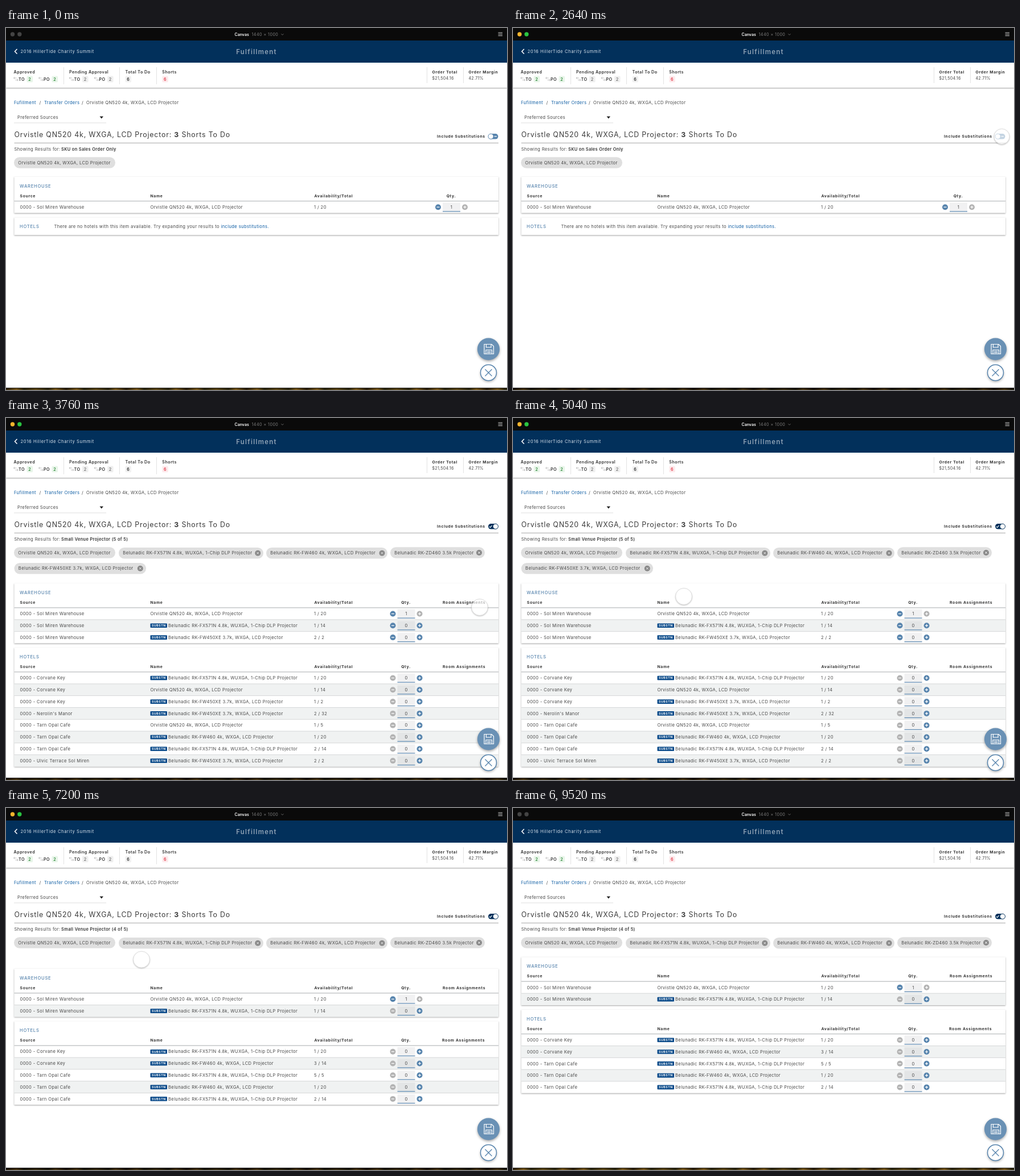
Recreate the animation shown at these times as an HTML page. Size 880x637 px, loop 9600 ms.

```html
<!DOCTYPE html>
<html lang="en">
<head>
<meta charset="utf-8">
<title>Fulfillment</title>
<style>
  html, body { margin: 0; width: 100%; height: 100%; overflow: hidden; background: #fff; }
  svg { display: block; width: 880px; height: 637px; font-family: Inter, "Open Sans", sans-serif; }
  text { white-space: pre; }
  .raised { filter: drop-shadow(0 1px 1.3px rgba(0, 0, 0, .38)); }
  .floating { filter: drop-shadow(0 2px 2px rgba(0, 0, 0, .35)); }
</style>
</head>
<body>
<svg id="stage" viewBox="0 0 880 637"></svg>
<script>
const LOOP = 9600, STEP = 80;
const BLUE = '#5784ad', NAVY = '#02305b', LINK = '#0c5ca3', INK = '#484848', GRAY = '#b3b3b3';

// size, weight, letter spacing (em), colour
const STYLES = {
  body: [7.6, 400, .05, INK],
  strong: [7.4, 600, .05, '#333'],
  label: [7.2, 600, .065, '#333'],
  head: [6.8, 700, .1, '#333'],
  section: [7.6, 500, .1, BLUE],
  title: [12.4, 400, .065, '#3c3c3c'],
  amount: [7.2, 400, .03, INK],
  tag: [5.2, 700, .11, '#fff'],
  page: [11.4, 600, .11, '#8fa2b5'],
  event: [7.5, 400, .09, '#dce5ee'],
  window: [7, 600, 0, '#fff'],
  size: [7.2, 400, .06, '#7d7d7d'],
};

const text = (x, y, str, style = 'body', color, anchor = 'start') => {
  const [size, weight, spacing, ink] = STYLES[style];
  return `<text x="${x}" y="${y + size * .36}" font-size="${size}" font-weight="${weight}"
    letter-spacing="${spacing * size}" fill="${color || ink}" text-anchor="${anchor}">${str}</text>`;
};
const rect = (x, y, w, h, fill, extra = '') =>
  `<rect x="${x}" y="${y}" width="${w}" height="${h}" fill="${fill}" ${extra}/>`;
const circle = (x, y, r, fill, extra = '') => `<circle cx="${x}" cy="${y}" r="${r}" fill="${fill}" ${extra}/>`;
const line = (d, color, width = 1, extra = '') =>
  `<path d="${d}" fill="none" stroke="${color}" stroke-width="${width}" ${extra}/>`;
const group = (id, content, extra = '') => `<g id="${id}" ${extra}>${content}</g>`;

const MAIN = 'Orvistle QN520 4k, WXGA, LCD Projector';
const DLP = 'Belunadic RK-FX571N 4.8k, WUXGA, 1-Chip DLP Projector';
const LCD = 'Belunadic RK-FW460 4k, WXGA, LCD Projector';
const SMALL = 'Belunadic RK-ZD460 3.5k Projector';
const ZOOM = 'Belunadic RK-FW450XE 3.7k, WXGA, LCD Projector';
const DEPOT = 'Sol Miren Warehouse', BAY = 'Corvane Key', CAFE = 'Tarn Opal Cafe';

function stepper(cx, y, qty, canRemove, canAdd) {
  const button = (x, on, d) => circle(x, y, 5, on ? BLUE : GRAY) + line(`M${x - 2.5} ${y}h5${d}`, '#fff', 1.2);
  return button(cx - 23.5, canRemove, '') + button(cx + 23.5, canAdd, 'm-2.5 -2.5v5') +
    rect(cx - 15.5, y - 8, 31, 15, 'rgba(0,15,30,.055)') +
    rect(cx - 15.5, y + 7, 31, 1.2, BLUE) + text(cx, y, qty, 'body', INK, 'middle');
}

// rows: [source, product, availability, quantity, can remove]
function card(top, name, rows, { qtyX = 703, rooms = 767 } = {}) {
  const base = top + 43, pitch = 20.8;
  let out = rect(14.5, top, 850.5, 43 + pitch * rows.length, '#fff', 'class="raised"') +
    text(24, top + 16.3, name, 'section') +
    text(24.5, top + 33.5, 'Source', 'head') + text(253.5, top + 33.5, 'Name', 'head') +
    text(541.5, top + 33.5, 'Availability/Total', 'head') +
    text(qtyX - .5, top + 33.5, 'Qty.', 'head', '', 'middle') +
    (rooms ? text(rooms, top + 33.5, 'Room Assignments', 'head') : '');
  rows.forEach(([source, product, stock, qty, canRemove], i) => {
    const y = base + pitch * i, mid = y + 10.5, sub = product !== MAIN;
    if (i % 2) out += rect(14.5, y, 850.5, pitch, '#f0f2f2');
    if (i) out += rect(14.5, y - .4, 850.5, .9, '#d2d4d5');
    out += text(24.5, mid, '0000 - ' + source) + text(sub ? 285 : 253.5, mid, product) +
      text(541, mid, stock) + stepper(qtyX, mid, qty, canRemove, !qty);
    if (sub) out += rect(253.5, mid - 3.8, 29.5, 7.6, '#0b4b8a', 'rx="1"') + text(256, mid, 'SUBSTN', 'tag');
  });
  return out + rect(14.5, base - .8, 850.5, 1.3, '#bcbfc1');
}

const cross = (x, y, s) => `M${x - s} ${y - s}l${2 * s} ${2 * s}m0 ${-2 * s}l${-2 * s} ${2 * s}`;
const chip = (x, y, w, label, icon, fill = '#dfdfdf', ink = INK, disc = '#888', mark = '#eee') =>
  rect(x, y - 9.8, w, 19.6, fill, 'rx="9.8"') + text(x + 7.3, y, label, 'body', ink) +
  (icon ? circle(icon, y, 5, disc) + line(cross(icon, y, 1.9), mark, 1) : '');

function header() {
  const swap = x => line(`M${x + 2} 86l-2 2 2 2M${x} 88h5M${x + 6} 89.5l2 2 -2 2M${x + 3} 91.5h5`, '#aaa', .7);
  const badge = (x, n, ink, fill) =>
    rect(x, 84.5, 10.5, 11, fill, 'rx="1.5"') + text(x + 5.3, 90, n, 'label', ink, 'middle');
  const orders = (x, ink, fill) => swap(x) + text(x + 8.5, 90, 'TO', 'label') + badge(x + 23, 2, ink, fill) +
    swap(x + 44) + text(x + 52.5, 90, 'PO', 'label') + badge(x + 67, 2, ink, fill);
  const rule = (x, h) => rect(x, 69, 1, h, '#e2e2e2');
  return rect(0, 61, 880, 44, '#fff', 'class="raised"') +
    rect(0, 0, 880, 22, '#0a0a0a') + rect(0, 22, 880, 39, NAVY) +
    text(401.5, 11, 'Canvas', 'window') + text(431.5, 11, '1440 × 1000', 'size') +
    line('M483.5 10.3l2 2 2-2', '#777', .9) +
    line('M864.5 8.2h7.5m-7.5 2.7h7.5m-7.5 2.7h7.5', '#ccc', 1) +
    line('M19.5 37l-4 4.3 4 4.3', '#fff', 1.5) +
    text(25.5, 41.5, '2016 HillerTide Charity Summit', 'event') +
    text(440, 42, 'Fulfillment', 'page', '', 'middle') +
    text(13.5, 77.3, 'Approved', 'label') + orders(13.5, '#2f8a3c', '#e8f5e9') +
    text(111, 77.3, 'Pending Approval', 'label') + orders(111, '#777', '#efefef') +
    text(209.5, 77.3, 'Total To Do', 'label') + badge(209.5, 6, '#333', '#f1f1f1') +
    text(274.3, 77.3, 'Shorts', 'label') + badge(274.3, 6, '#e2404f', '#fdeaec') +
    rule(101, 30) + rule(199, 30) + rule(264, 30) + rule(739, 28) + rule(803, 28) +
    text(748.5, 78, 'Order Total', 'head') + text(748.5, 88.5, '$21,504.16', 'amount') +
    text(812.5, 78, 'Order Margin', 'head') + text(812.5, 88.5, '42.71%', 'amount');
}

function intro() {
  return text(14, 131.7, 'Fufillment', 'body', LINK) + text(58.5, 131.7, '/') +
    text(67, 131.7, 'Transfer Orders', 'body', LINK) + text(133, 131.7, '/') + text(141, 131.7, MAIN) +
    text(20, 157.3, 'Preferred Sources') + rect(14, 166.5, 162, .9, '#dcdcdc') +
    '<path d="M164.5 155.5h6.5l-3.2 4z" fill="#222"/>' +
    text(14.5, 188, MAIN + ': <tspan font-weight="700">3</tspan> Shorts To Do', 'title') +
    rect(14.5, 201.7, 850.5, 1.4, '#bebebe') +
    text(757, 190.8, 'Include Substitutions', 'head') +
    text(14.5, 213.7, 'Showing Results for:') + chip(14, 237, 178, MAIN);
}

const toggle = () => rect(847, 186, 17.5, 9.6, BLUE, 'rx="4.8" id="track"') +
  line('M857.5 190.8h4.5', '#fff', 1.2, 'id="dash"') + line('M848.8 190.8l1.8 1.8 3-3.4', '#fff', 1.1, 'id="tick"') +
  circle(851.6, 190.8, 4.6, '#fff', `id="knob" stroke="${BLUE}" stroke-width=".9"`);

const buttons = () => circle(847.5, 565, 19.6, '#6a91b5', 'class="floating"') +
  line('M840 556.5h13l3.5 3.5v13.5h-16.5zM843.5 556.5v5.5h8.5v-5.5M843 573.5v-7h10.5v7M845 569h6.5m-6.5 2.3h6.5', '#fff', 1.2) +
  circle(847.5, 606.5, 14, '#fff', 'class="floating"') +
  circle(847.5, 606.5, 14, 'none', `stroke="${BLUE}" stroke-width="1.5"`) +
  line(cross(847.5, 606.5, 6), BLUE, 1.4);

const showing = str => text(97, 213.7, str, 'strong');

const before = showing('SKU on Sales Order Only') +
  card(261.7, 'WAREHOUSE', [[DEPOT, MAIN, '1 / 20', 1, true]], { qtyX: 782.5, rooms: 0 }) +
  rect(14.5, 333.3, 850.5, 31, '#fff', 'class="raised"') + text(24, 349.5, 'HOTELS', 'section') +
  text(84.5, 349.5, 'There are no hotels with this item available. Try expanding your results to ' +
    `<tspan fill="${LINK}">include substitutions.</tspan>`);

const allItems = showing('Small Venue Projector (5 of 5)') +
  card(291, 'WAREHOUSE', [
    [DEPOT, MAIN, '1 / 20', 1, true],
    [DEPOT, DLP, '1 / 14', 0, true],
    [DEPOT, ZOOM, '2 / 2', 0, true],
  ]) +
  card(404, 'HOTELS', [
    [BAY, DLP, '1 / 20', 0],
    [BAY, MAIN, '1 / 14', 0],
    [BAY, ZOOM, '1 / 2', 0],
    ["Nerolin's Manor", ZOOM, '2 / 32', 0],
    [CAFE, MAIN, '1 / 5', 0],
    [CAFE, LCD, '1 / 20', 0],
    [CAFE, DLP, '2 / 14', 0],
    ['Ulvic Terrace Sol Miren', ZOOM, '2 / 2', 0],
  ]);

const fewerItems = showing('Small Venue Projector (4 of 5)') + group('fewerCards',
  card(262.3, 'WAREHOUSE', [[DEPOT, MAIN, '1 / 20', 1, true], [DEPOT, DLP, '1 / 14', 0]]) +
  card(354.7, 'HOTELS', [
    [BAY, DLP, '1 / 20', 0],
    [BAY, LCD, '3 / 14', 0],
    [CAFE, DLP, '5 / 5', 0],
    [CAFE, LCD, '1 / 20', 0],
    [CAFE, DLP, '2 / 14', 0],
  ], { rooms: 766 }));

const stage = document.getElementById('stage');
stage.innerHTML = `<defs>
    <linearGradient id="desktop" x2=".06" spreadMethod="reflect">
      <stop stop-color="#2a1f0a"/><stop offset=".35" stop-color="#76561a"/>
      <stop offset=".6" stop-color="#2b2710"/><stop offset="1" stop-color="#5a4515"/>
    </linearGradient>
    <clipPath id="page"><path d="M0 22H880V633H0z"/></clipPath>
  </defs>` +
  rect(0, 0, 880, 637, '#fff') + header() + intro() + toggle() +
  group('before', before) + group('all', allItems) + group('fewer', fewerItems) +
  group('chips', chip(198, 237.7, 254, DLP, 442.3) + chip(457, 237.7, 213, LCD, 660.5) +
    chip(675, 237, 166, SMALL, 831)) +
  group('lastChip', chip(14.5, 264.7, 231.5, ZOOM, 235.8) +
    group('pressedChip', chip(14.5, 264.2, 231.5, ZOOM, 235.8, '#959595', '#f1f1f1', '#f4f4f4', '#888'), 'class="floating"')) +
  buttons() + circle(11.5, 11, 3.7, '#444', 'id="amber"') + circle(23.8, 11, 3.7, '#444', 'id="green"') +
  `<g clip-path="url(#page)">${circle(0, 0, 14.4, '#fff',
    'id="cursor" class="raised" stroke="#bbb" stroke-width=".7"')}</g>` +
  rect(0, 633, 880, 4, 'url(#desktop)') + rect(0, 633, 880, 1, '#0d0b08') +
  rect(0, 633, 880, 4, '#000', 'id="windowShadow"');

const el = id => document.getElementById(id);
const set = (id, attrs) => { for (const key in attrs) el(id).setAttribute(key, attrs[key]); };

// Linear track through [time, value, ...]
function track(keys, t) {
  const next = keys.findIndex(k => k[0] > t);
  if (next === 0) return keys[0].slice(1);
  if (next < 0) return keys[keys.length - 1].slice(1);
  const a = keys[next - 1], b = keys[next], p = (t - a[0]) / (b[0] - a[0]);
  return a.slice(1).map((v, i) => v + (b[i + 1] - v) * p);
}
const ramp = (t, from, to) => Math.min(1, Math.max(0, (t - from) / (to - from)));
const smooth = p => p * p * (3 - 2 * p);

const CURSOR = [
  [320, 800, 625], [400, 795, 603], [560, 770, 585], [880, 770, 585], [1360, 745, 566],
  [1520, 745, 566], [1760, 757, 520], [2080, 805, 350], [2320, 848, 222], [2480, 858, 192],
  [2640, 858.5, 191], [3360, 858.5, 191], [3520, 864, 225], [3680, 848, 305], [3760, 832, 333],
  [3920, 700, 350], [4080, 535, 342], [4160, 502, 337], [4480, 502, 337], [4720, 440, 332],
  [5040, 300, 314], [5360, 240, 304], [5440, 240, 304], [5760, 238, 267], [7920, 238, 266.5],
  [8160, 262, 310], [8560, 390, 500], [8800, 455, 585], [8960, 475, 606], [9280, 490, 650],
];
const COLLAPSE = [[7040, 29], [7120, 27], [7200, 20.5], [7280, 7], [7360, .7], [7440, 0]];

function draw(t) {
  const on = smooth(ramp(t, 2720, 3040)), removed = smooth(ramp(t, 6880, 7120));
  set('before', { opacity: 1 - on });
  set('all', { opacity: on * (1 - removed) });
  set('fewer', { opacity: removed });
  set('fewerCards', { transform: `translate(0 ${track(COLLAPSE, t)[0]})` });
  set('chips', { opacity: on });
  set('lastChip', { opacity: on * (1 - removed) });
  set('pressedChip', { opacity: ramp(t, 5680, 6240) });

  const tint = on > .5 ? NAVY : BLUE;
  set('track', { fill: tint });
  set('knob', { cx: 851.6 + 8.3 * on, stroke: tint });
  set('dash', { opacity: 1 - on });
  set('tick', { opacity: on });

  const active = t >= 960 && t < 9520;
  set('amber', { fill: active ? '#f6b42c' : '#444' });
  set('green', { fill: active ? '#2ac441' : '#444' });
  set('windowShadow', { opacity: active ? .45 : 0 });

  const [x, y] = track(CURSOR, t);
  const pressed = (t >= 2640 && t < 2800) || (t >= 6800 && t < 6960);
  set('cursor', { cx: x, cy: y, r: pressed ? 13.5 : 14.4, opacity: t >= 400 && t < 9280 ? .65 : 0 });
}

const start = performance.now();
function frame() {
  const t = (performance.now() - start) % LOOP;
  draw(Math.floor(t / STEP) * STEP);
  requestAnimationFrame(frame);
}
draw(0);
requestAnimationFrame(frame);
</script>
</body>
</html>
```
